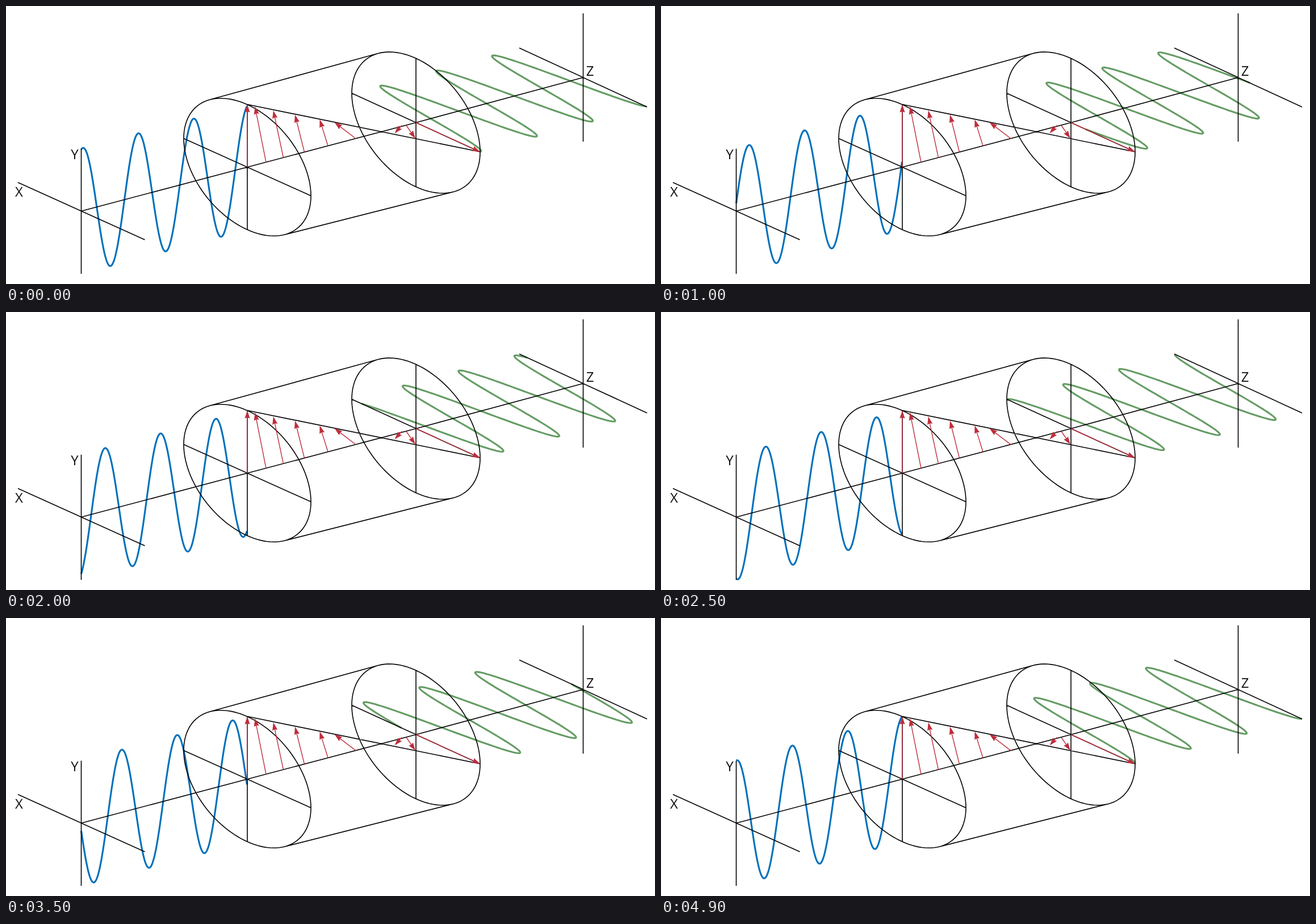
These frames come from a looping animation (1143x490 px, 5 s). An HTML page:

```html
<!DOCTYPE html>
<html lang="en">
<head>
<meta charset="utf-8">
<title>Polarisation rotation</title>
<style>
  html, body { margin: 0; width: 100%; height: 100%; overflow: hidden; background: #fff; }
  svg { display: block; width: 1143px; height: 490px; }
  path { fill: none; }
  #blue, #green { stroke-width: 3.1; stroke-linejoin: round; }
  #blue { stroke: #0071bb; }
  #green { stroke: #659c64; }
  #lines { stroke: #000; stroke-width: 1.6; }
  #shafts { stroke: #be2d3c; stroke-width: 1.4; }
  #heads { fill: #be2d3c; }
  text { font: 500 24px "Open Sans", "Noto Sans", sans-serif; font-stretch: 62.5%; text-anchor: middle; fill: #111; }
</style>
</head>
<body>
<svg viewBox="0 0 1143 490">
  <path id="blue"/>
  <path id="green"/>
  <path id="lines"/>
  <path id="shafts"/>
  <path id="heads"/>
  <text x="121" y="269.5">Y</text>
  <text x="23" y="336">X</text>
  <text x="1028.5" y="122.5">Z</text>
</svg>
<script>
const LOOP = 5000, STEP = 100, TAU = 2 * Math.PI;
const start = [132.5, 361.5], entry = [425, 284], exit = [722, 205.5], end = [1016.5, 126];
const $ = id => document.getElementById(id);

const fmt = p => p.map(v => v.toFixed(2)).join(' ');
const poly = points => 'M' + points.map(fmt).join('L');
const segment = (x1, y1, x2, y2) => poly([[x1, y1], [x2, y2]]);

// Point of a unit circle drawn in the oblique projection.
function onDisc([cx, cy], [w, h, v], angle) {
  const c = Math.cos(angle), s = Math.sin(angle);
  return [cx + w * c, cy + h * c - v * s];
}

function disc(center, size) {
  const points = Array.from({ length: 121 }, (_, i) => onDisc(center, size, i / 120 * TAU));
  const diameter = a => poly([onDisc(center, size, a), onDisc(center, size, a + Math.PI)]);
  return poly(points) + 'Z' + diameter(0) + diameter(TAU / 4);
}

const nearSize = [112, 50.5, 110.3], farSize = [113, 51.7, 113.2];
const side = angle => poly([onDisc(entry, nearSize, angle), onDisc(exit, farSize, angle)]);
const tangent = 2.199;

$('lines').setAttribute('d', [
  poly([start, entry, exit, end]),
  segment(132.5, 251.5, 132.5, 472),
  segment(21, 311, 244.5, 412),
  segment(1016.5, 13, 1016.5, 239),
  segment(904, 74, 1129, 178),
  disc(entry, nearSize),
  disc(exit, farSize),
  side(tangent),
  side(tangent + Math.PI),
  segment(425, 173.5, 835, 257)
].join(''));

const arrows = [
  [425, 284, 425, 173.5],
  [458, 275.5, 438.5, 177],
  [488.5, 267.5, 470.8, 184],
  [525.5, 257.5, 509, 191.5],
  [567, 246.5, 552.5, 200],
  [616.5, 234, 578.5, 205],
  [697, 210.5, 684.5, 224.5],
  [705, 210.5, 721, 233.5],
  [722, 205.5, 835, 257]
];

function head([x1, y1, x2, y2]) {
  const len = Math.hypot(x2 - x1, y2 - y1);
  const ux = (x2 - x1) / len, uy = (y2 - y1) / len;
  const at = (back, off) => [x2 - ux * back - uy * off, y2 - uy * back + ux * off];
  return poly([at(0, 0), at(14, 4.6), at(12.5, 0), at(14, -4.6)]) + 'Z';
}

// Shafts stop inside their heads so the tips stay sharp.
function shaft([x1, y1, x2, y2]) {
  const k = 1 - 8 / Math.hypot(x2 - x1, y2 - y1);
  return segment(x1, y1, x1 + (x2 - x1) * k, y1 + (y2 - y1) * k);
}

$('shafts').setAttribute('d', arrows.map(shaft).join(''));
$('heads').setAttribute('d', arrows.map(head).join(''));

function wave(from, to, length, shift, dx, dy) {
  const slope = (to[1] - from[1]) / (to[0] - from[0]);
  const span = to[0] - from[0], count = 300;
  return poly(Array.from({ length: count + 1 }, (_, i) => {
    const d = span * i / count;
    const c = Math.cos(TAU * (d - shift) / length);
    return [from[0] + d + dx * c, from[1] + d * slope + dy * c];
  }));
}

function draw(time) {
  const phase = Math.floor(time % LOOP / STEP) * STEP / LOOP;
  $('blue').setAttribute('d', wave(start, [424.4, 284.2], 97.5, 97.5 * phase + 2.95, 0, -110.5));
  $('green').setAttribute('d', wave(exit, end, 98.4, 98.4 * phase + 1.3, 112.4, 51.5));
}

const origin = performance.now();
function tick() {
  draw(performance.now() - origin);
  requestAnimationFrame(tick);
}
tick();
</script>
</body>
</html>
```
